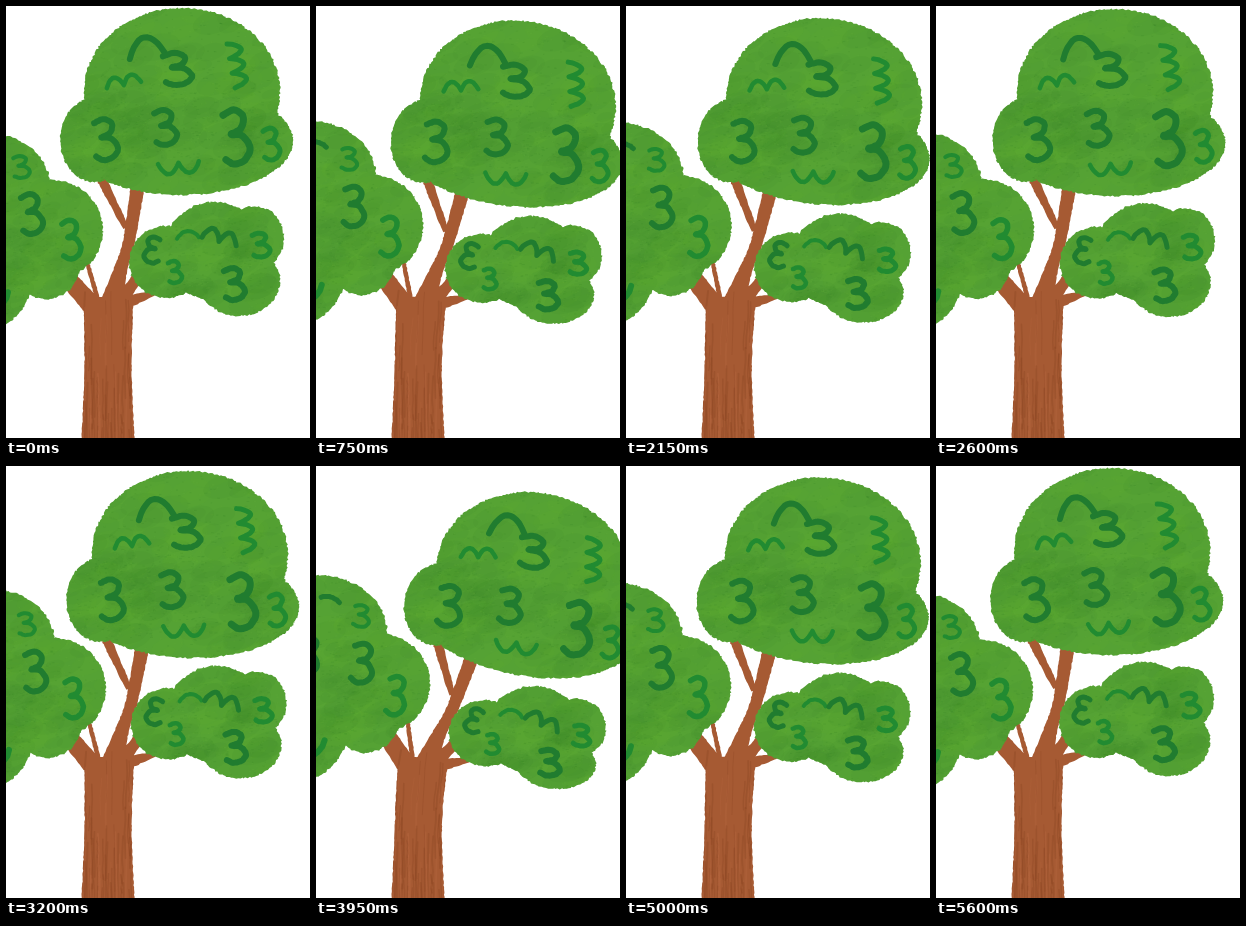
Recreate the animation shown at these times as an HTML page with a canvas. Size 304 by 432 pixels, loop 5650 ms.

```html
<!DOCTYPE html>
<html lang="en">
<head>
<meta charset="utf-8">
<title>Swaying tree</title>
<style>
html, body { margin: 0; width: 100%; height: 100%; overflow: hidden; background: #fff; }
canvas { display: block; }
</style>
</head>
<body>
<canvas id="stage" width="304" height="432"></canvas>
<script>
const ctx = document.getElementById('stage').getContext('2d');
const LOOP = 5650, STEP = 50, SPINE = 100, MAX_BEND = 0.217;
const DARK = '#207c2f', LIGHT = '#218b31';

let seed = 11;
const rand = () => (seed = (seed * 16807) % 2147483647) / 2147483647;
const spread = n => (rand() - 0.5) * 2 * n;
const many = (n, make) => Array.from({ length: Math.round(n) }, (_, i) => make(i));
const roughen = (pts, n) => pts.map(([x, y]) => [x + spread(n), y + spread(n)]);

// Open Catmull-Rom curve; a point may carry a width as its third value
function smooth(pts) {
  const out = [], last = pts.length - 1;
  for (let i = 0; i < last; i++) {
    const a = pts[Math.max(0, i - 1)], b = pts[i], c = pts[i + 1], d = pts[Math.min(last, i + 2)];
    const steps = Math.ceil(Math.hypot(c[0] - b[0], c[1] - b[1]) / 2);
    for (let k = 0; k < steps; k++) {
      const t = k / steps;
      out.push(b.map((v, j) => {
        const bend2 = 2 * a[j] - 5 * v + 4 * c[j] - d[j];
        const bend3 = 3 * (v - c[j]) + d[j] - a[j];
        return v + 0.5 * t * (c[j] - a[j] + t * (bend2 + t * bend3));
      }));
    }
  }
  return [...out, pts[last]];
}

function ellipse([cx, cy, rx, ry]) {
  const n = Math.round((rx + ry) * 1.8);
  return roughen(many(n, i => {
    const a = i / n * 2 * Math.PI;
    return [cx + rx * Math.cos(a), cy + ry * Math.sin(a)];
  }), 0.9);
}

// A crown is a union of ellipses [cx, cy, rx, ry] with mottled colour inside
function crown(...lobes) {
  const spot = ([cx, cy, rx, ry]) => [cx + spread(rx), cy + spread(ry)];
  const dabs = (share, make) => lobes.flatMap(l => many(l[2] * l[3] * share, () => ({ p: spot(l), ...make() })));
  return {
    edges: lobes.map(ellipse),
    blots: dabs(0.014, () =>
      ({ r: 5 + rand() * 13, color: rand() < 0.58 ? 'rgba(48,126,40,.065)' : 'rgba(98,172,48,.075)' })),
    grain: dabs(0.07, () =>
      ({ w: 1 + rand() * 2, color: rand() < 0.5 ? 'rgba(45,120,35,.13)' : 'rgba(112,180,65,.13)' }))
  };
}

const crowns = [
  crown([-20, 180, 64, 53], [45, 224, 52, 50], [40, 258, 34, 35], [-25, 260, 55, 65]),
  crown([160, 256, 37, 36], [208, 245, 50, 49], [248, 232, 30, 32], [233, 275, 41, 35]),
  crown([176, 85, 98, 83], [88, 134, 34, 42], [175, 135, 112, 54])
];

// A limb follows points [x, y, width]
function limb(...spine) {
  const mid = smooth(spine), n = mid.length - 1;
  const side = s => mid.map(([x, y, w], i) => {
    const a = mid[Math.max(0, i - 1)], b = mid[Math.min(n, i + 1)];
    const dir = Math.atan2(b[1] - a[1], b[0] - a[0]);
    return [x - s * Math.sin(dir) * w / 2, y + s * Math.cos(dir) * w / 2];
  });
  return roughen([...side(1), ...side(-1).reverse()], 0.4);
}

const wood = [
  limb([102, 434, 53], [102, 360, 47], [102.5, 291, 50]),
  limb([106, 295, 22], [115, 262, 13], [123, 235, 12], [132, 178, 14]),
  limb([87, 301, 19], [64, 275, 18]),
  limb([92, 294, 5], [81, 256, 4]),
  limb([120, 222, 6], [94, 170, 10]),
  limb([116, 294, 14], [132, 270, 10]),
  limb([118, 297, 14], [151, 286, 4])
];

const streaks = many(70, () => {
  const x = 77 + rand() * 51, y = 285 + rand() * 140, len = 15 + rand() * 55;
  return {
    pts: many(5, i => [x + spread(0.8), y + len * i / 4]),
    w: 0.7 + rand() * 1.5,
    color: rand() < 0.65 ? 'rgba(125,58,28,.24)' : 'rgba(190,112,72,.2)'
  };
});

const THREE = [[0, .1], [.4, 0], [.75, .12], [.65, .35], [.3, .45], [.7, .47], [1, .7], [.8, .93], [.4, 1], [.1, .92]];
const three = (color, w, x, y, width, height) =>
  ({ color, w, pts: roughen(smooth(THREE.map(([u, v]) => [x + u * width, y + v * height])), 0.25) });

// A row of n bumps to the left of the way from one point to another
function bumps(color, w, [x0, y0], [x1, y1], n, depth) {
  const dx = x1 - x0, dy = y1 - y0, k = depth / Math.hypot(dx, dy);
  const pts = many(12 * n + 1, i => {
    const t = i / (12 * n), rise = k * Math.abs(Math.sin(Math.PI * n * t)) ** 0.8;
    return [x0 + dx * t + dy * rise, y0 + dy * t - dx * rise];
  });
  return { color, w, pts: roughen(pts, 0.25) };
}

const marks = [
  three(DARK, 6, 88, 113, 24, 41),
  three(DARK, 6, 148, 104, 23, 35),
  three(DARK, 7, 217, 104, 27, 54),
  three(LIGHT, 5, 257, 122, 17, 32),
  bumps(DARK, 6, [124, 53], [159, 47], 1, 19),
  three(DARK, 6, 157, 47, 29, 32),
  bumps(LIGHT, 5, [221, 38], [229, 82], 3, 13),
  bumps(LIGHT, 4.5, [101, 82], [135, 76], 2, 9),
  bumps(LIGHT, 4.5, [152, 158], [193, 155], 2, -11),
  three(DARK, 5, 154, 231, -16, 26),
  bumps(LIGHT, 4, [171, 233], [193, 231], 1, 7),
  bumps(DARK, 5, [196, 231], [230, 240], 2, 11),
  three(LIGHT, 5, 246, 227, 18, 24),
  three(DARK, 6, 218, 262, 21, 32),
  three(LIGHT, 4.5, 162, 255, 14, 22),
  three(LIGHT, 4, 7, 150, 17, 22),
  three(DARK, 6, 15, 188, 22, 40),
  three(LIGHT, 5.5, 56, 214, 19, 39),
  bumps(LIGHT, 6, [-14, 302], [2, 286], 1, -4),
  bumps(DARK, 5, [-28, 150], [-9, 152], 1, 3),
  three(DARK, 5, -38, 192, 20, 38)
];

// Bend grows from the foot of the trunk, then stays constant through the crown
let bend = 0;
function warp([x, y]) {
  const h = 432 - y, u = Math.max(0, Math.min(1, (h - 30) / 190));
  const angle = bend * u * u * (3 - 2 * u);
  const shift = bend * (190 * (u ** 3 - u ** 4 / 2) + Math.max(0, h - 220));
  const sin = Math.sin(angle);
  return [SPINE + shift + (x - SPINE) * Math.cos(angle), y + (x - SPINE) * sin + shift * sin];
}

function trace(path, pts) {
  pts.forEach((p, i) => path[i ? 'lineTo' : 'moveTo'](...warp(p)));
  return path;
}

function line({ pts, w, color }) {
  ctx.lineWidth = w;
  ctx.strokeStyle = color;
  ctx.stroke(trace(new Path2D(), pts));
}

// Fill the union of outlines, then paint texture inside it
function textured(outlines, color, paint) {
  const path = new Path2D();
  for (const pts of outlines) trace(path, pts).closePath();
  ctx.save();
  ctx.fillStyle = color;
  ctx.fill(path);
  ctx.clip(path);
  paint();
  ctx.restore();
}

function drawCrown({ edges, blots, grain }) {
  textured(edges, '#55a234', () => {
    for (const { p, r, color } of blots) {
      ctx.fillStyle = color;
      ctx.beginPath();
      ctx.ellipse(...warp(p), r * 1.4, r * 0.75, -0.3, 0, 7);
      ctx.fill();
    }
    for (const { p, w, color } of grain) {
      ctx.fillStyle = color;
      ctx.fillRect(...warp(p), w, 1);
    }
  });
}

function draw(time) {
  bend = MAX_BEND * (1 - Math.cos(4 * Math.PI * time / LOOP)) / 2;
  ctx.fillStyle = '#fff';
  ctx.fillRect(0, 0, 304, 432);
  ctx.lineCap = ctx.lineJoin = 'round';
  textured(wood, '#a65a33', () => streaks.forEach(line));
  crowns.forEach(drawCrown);
  marks.forEach(line);
}

const start = performance.now();
function tick() {
  const t = Math.max(0, performance.now() - start);
  draw(Math.floor(t / STEP) * STEP % LOOP);
  requestAnimationFrame(tick);
}
tick();
</script>
</body>
</html>
```
